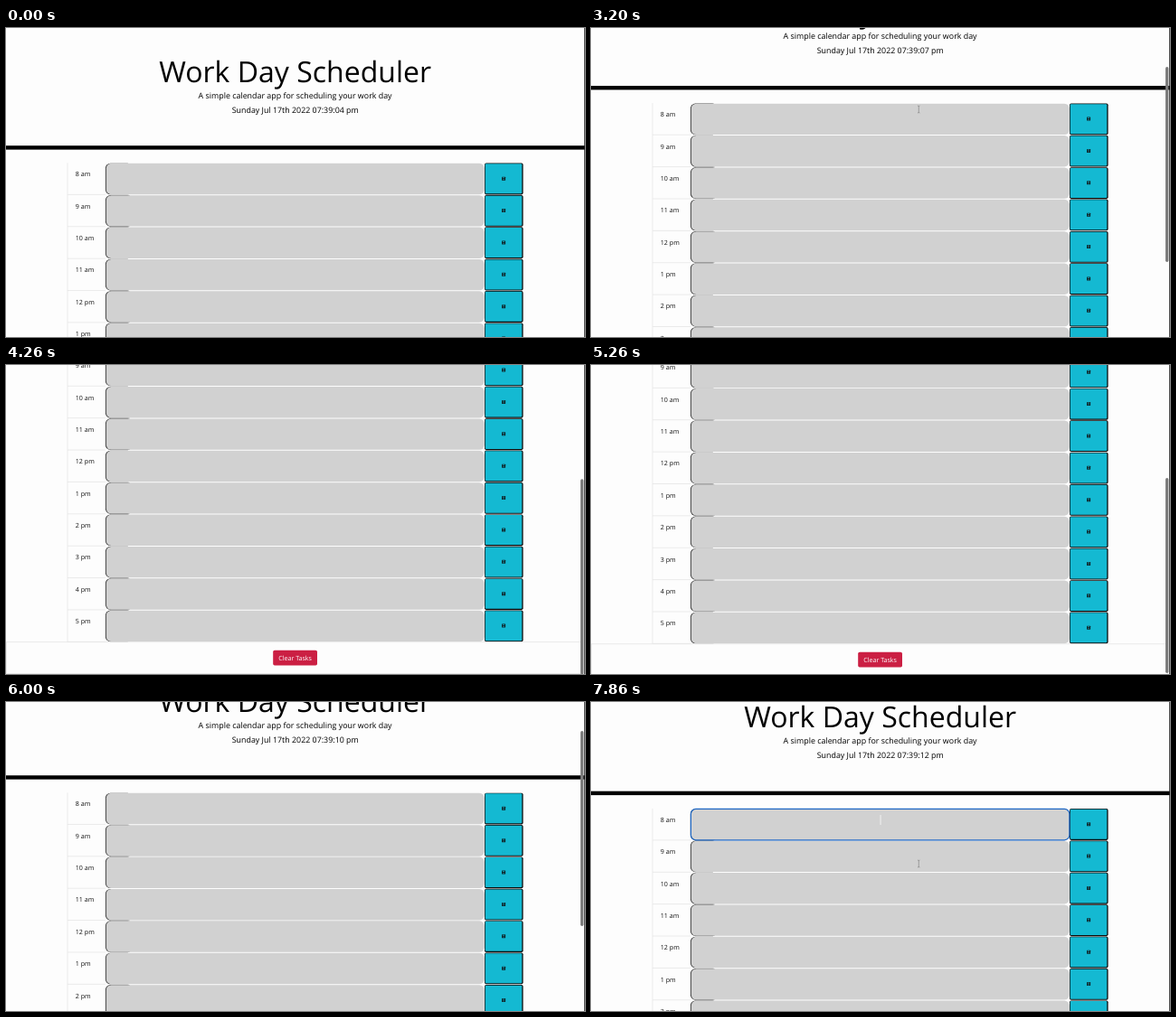
These frames come from a looping animation (640x342 px, 8 s). An HTML page:

```html
<!DOCTYPE html>
<html lang="en">
<head>
<meta charset="utf-8">
<title>Work Day Scheduler</title>
<style>
  html, body { margin: 0; width: 100%; height: 100%; overflow: hidden; background: #fdfdfd; }
  svg { display: block; width: 100vw; height: 100vh; }
  text { font-family: "Open Sans", sans-serif; font-size: 7.11px; fill: #111; text-rendering: geometricPrecision; }
  .mid { text-anchor: middle; }
  .title { font-size: 32px; fill: #000; }
  .lead { font-size: 8.89px; fill: #000; }
  .hair { fill: none; stroke: #e6e6e6; stroke-width: .8; }
</style>
</head>
<body>
<svg viewBox="0 0 640 342" preserveAspectRatio="none">
  <defs>
    <g id="row">
      <path class="hair" d="M68 0V35.4M68 35H110"/>
      <rect x="109.9" y=".3" width="30" height="34.6" rx="5.5" fill="#333"/>
      <rect x="110.8" y=".4" width="418" height="34.4" rx="5.5" fill="#d1d1d1"/>
      <rect x="529" y=".2" width="42.6" height="34.8" rx="1.8" fill="#0b0b0b"/>
      <rect x="529.7" y=".9" width="40.6" height="33" rx="1" fill="#14b9d2"/>
      <rect x="548" y="15.3" width="4.1" height="4" rx=".5" fill="#10262b"/>
      <path d="M548.9 16.3h2.1" stroke="#14b9d2" stroke-width=".7"/>
      <circle cx="550" cy="18.1" r=".55" fill="#14b9d2"/>
    </g>
  </defs>
  <g id="page">
    <text class="mid title" x="319.6" y="59.8">Work Day Scheduler</text>
    <text class="mid lead" x="319.6" y="77.7">A simple calendar app for scheduling your work day</text>
    <text class="lead" id="clock" x="249.7" y="93.7"></text>
    <rect y="130.2" width="640" height="4.4"/>
    <g id="rows"></g>
    <g id="focus">
      <rect x="110.4" y="149.9" width="418.4" height="34.4" rx="5.5" fill="none" stroke="#1c66c4" stroke-width="1.2"/>
      <rect x="319.6" y="156.5" width=".9" height="11" fill="#f4f4f4"/>
    </g>
    <rect class="hair" x=".5" y="503.2" width="637" height="34.8"/>
    <rect x="295.2" y="512.2" width="48.8" height="16.8" rx="1.8" fill="#cb1f43"/>
    <text class="mid" x="319.6" y="523.1" style="fill:#fff">Clear Tasks</text>
  </g>
  <rect id="thumb" x="635" width="3.4" height="216" rx="1.7" fill="#7c7c7c"/>
  <rect x="639.2" width=".8" height="342" fill="#222"/>
  <path id="cursor" d="M-1.2 -4Q0 -4 0 -3V3Q0 4 -1.2 4M1.2 -4Q0 -4 0 -3M0 3Q0 4 1.2 4" fill="none" stroke="#858585" stroke-width=".7"/>
</svg>
<script>
const LOOP = 8000;
const el = id => document.getElementById(id);
const clamp = v => Math.min(1, Math.max(0, v));

// [time, scroll offset]
const SCROLL = [[2800, 0], [3200, 66], [3650, 145], [4260, 196.5],
                [5200, 196.5], [5260, 194.5], [5600, 112], [6000, 49], [6550, 31.5]];
// [time, x, y]
const POINTER = [[800, 400, 346], [1600, 362.3, 90], [6930, 362.3, 150], [7330, 362.3, 179]];

const hours = ["8 am", "9 am", "10 am", "11 am", "12 pm", "1 pm", "2 pm", "3 pm", "4 pm", "5 pm"];
el("rows").innerHTML = hours.map((h, i) =>
  `<g transform="translate(0 ${149.4 + i * 35.38})"><use href="#row"/><text x="76.8" y="14.9">${h}</text></g>`).join("");

const slope = (a, b) => (b[1] - a[1]) / (b[0] - a[0]);

// Harmonic-mean tangents keep the curve monotone between keys.
function tangent(keys, i) {
  if (i === 0 || i === keys.length - 1) return i ? 0 : slope(keys[0], keys[1]) * .7;
  const a = slope(keys[i - 1], keys[i]), b = slope(keys[i], keys[i + 1]);
  return a * b > 0 ? 2 * a * b / (a + b) : 0;
}

function curve(keys, t) {
  const n = keys.length;
  if (t <= keys[0][0]) return keys[0][1];
  if (t >= keys[n - 1][0]) return keys[n - 1][1];
  const i = keys.findIndex(k => k[0] > t) - 1;
  const [t0, a] = keys[i], [t1, b] = keys[i + 1];
  const d = t1 - t0, u = (t - t0) / d, v = 1 - u;
  return v * v * (1 + 2 * u) * a + u * u * (3 - 2 * u) * b
    + d * u * v * (v * tangent(keys, i) - u * tangent(keys, i + 1));
}

function pointer(t) {
  const [a, b] = t < 6000 ? POINTER.slice(0, 2) : POINTER.slice(2);
  const u = clamp((t - a[0]) / (b[0] - a[0])), e = u * u * (3 - 2 * u);
  return [a[1] + (b[1] - a[1]) * e, a[2] + (b[2] - a[2]) * e];
}

function thumbAlpha(t) {
  if (t < 2800 || (t >= 5060 && t < 5200)) return 0;
  return 1 - clamp((t - (t < 5200 ? 4660 : 6930)) / 400);
}

function draw(t) {
  const y = curve(SCROLL, t);
  const sec = 5 + Math.floor((t - 830) / 1000);
  const time = `Sunday Jul 17th 2022 07:39:${String(sec).padStart(2, "0")} pm`;
  if (el("clock").textContent !== time) el("clock").textContent = time;
  el("page").setAttribute("transform", `translate(0 ${-y})`);
  el("thumb").setAttribute("y", .6 + y * .64);
  el("thumb").style.opacity = thumbAlpha(t);
  el("focus").style.display = t >= 7830 ? "" : "none";
  el("cursor").setAttribute("transform", `translate(${pointer(t)})`);
  el("cursor").style.display = (t >= 800 && t < 3660) || t >= 6930 ? "" : "none";
}

function tick() {
  draw(performance.now() % LOOP);
  requestAnimationFrame(tick);
}
tick();
</script>
</body>
</html>
```
